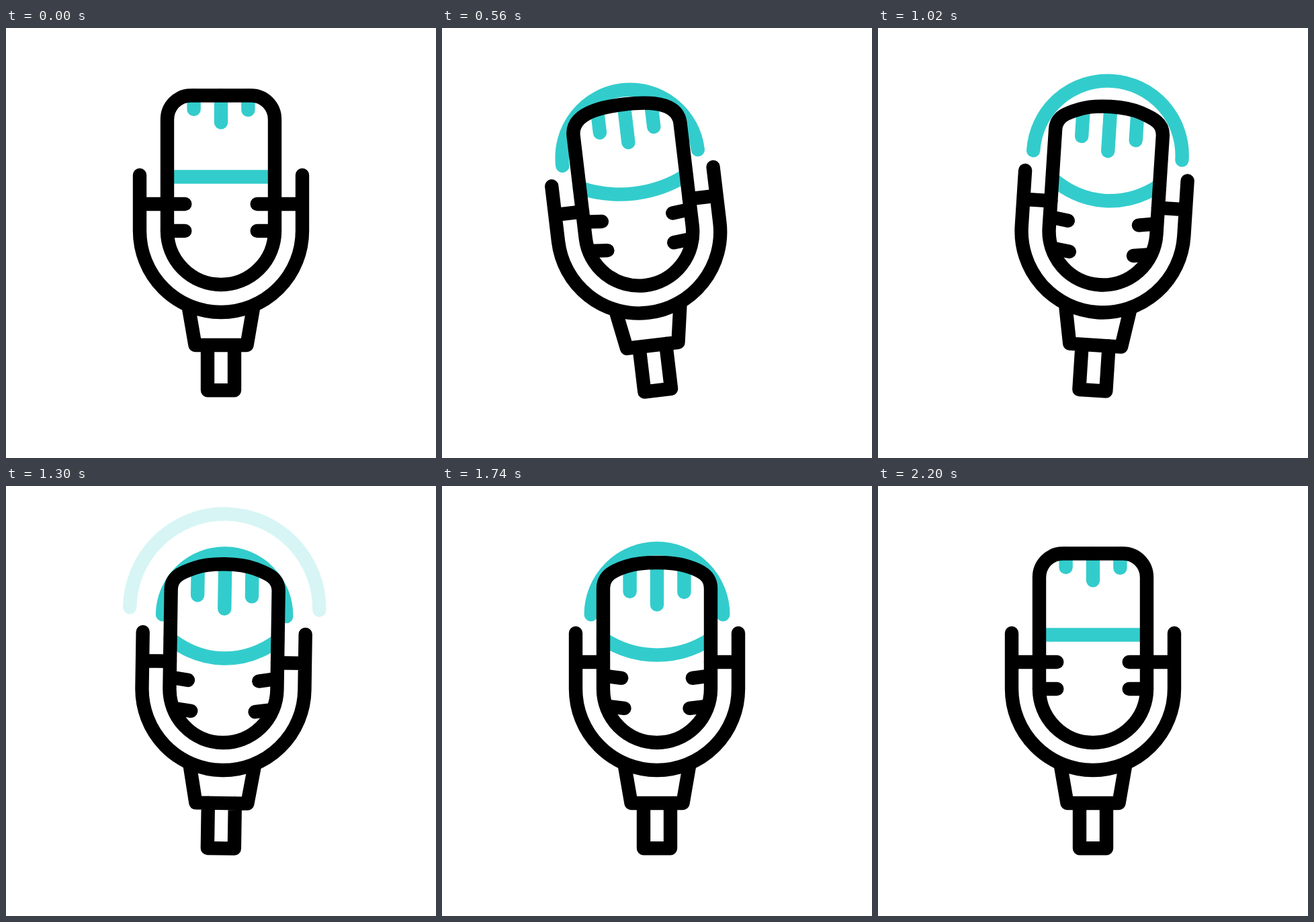
Recreate the animation shown at these times as an HTML page. Size 640 px wide and 640 px high, loop 2400 ms.

```html
<!DOCTYPE html>
<html>
<head>
<meta charset="utf-8">
<title>Microphone</title>
<style>
html, body { margin: 0; width: 100%; height: 100%; overflow: hidden; background: #fff; }
svg { display: block; width: 100vw; height: 100vh; fill: none; stroke-width: 20.4; stroke-linecap: round; stroke-linejoin: round; }
.teal { stroke: #3cc; }
.black { stroke: #000; }
</style>
</head>
<body>
<svg viewBox="0 0 640 640">
  <g id="mic">
    <g id="waves" class="teal"></g>
    <path id="back" fill="#fff"/>
    <path id="bar" class="teal"/>
    <path id="drips" class="teal"/>
    <g class="black">
      <path id="head"/>
      <path id="whiskers"/>
      <path d="M199 219V302A121 121 0 0 0 441 302V219M199 262H240M400 262H441"/>
      <path d="M272 417L281.5 472H358.5L368 417M300 472V539.3H340V472"/>
    </g>
  </g>
</svg>
<script>
const LOOP = 2400, WAVE_LIFE = 740, WAVE_STARTS = [200, 600, 1000, 1400];
const SWING = [[0, 0], [200, 0], [775, -10.8], [1120, 9.5], [1445, -6], [1700, 0], [LOOP, 0]];
const $ = id => document.getElementById(id);
const set = (id, d) => $(id).setAttribute('d', d);
const clamp = x => Math.max(0, Math.min(1, x));
const ease = x => { x = clamp(x); return x * x * (3 - 2 * x); };

const waves = WAVE_STARTS.map(() =>
  $('waves').appendChild(document.createElementNS('http://www.w3.org/2000/svg', 'path')));

function swing(t) {
  const i = SWING.findIndex(k => k[0] > t);
  const [t0, a] = SWING[i - 1], [t1, b] = SWING[i];
  return a + (b - a) * (t - t0) / (t1 - t0);
}

function drawWave(wave, age) {
  const r = 64 + 77.7 * ease(age / WAVE_LIFE);
  const y = 211.6 - 0.206 * r;
  const alpha = age < 0 ? 0 : clamp((WAVE_LIFE - age) / 200);
  wave.setAttribute('d', `M${320 - r} ${y}A${r} ${r} 0 0 1 ${320 + r} ${y}`);
  wave.setAttribute('opacity', alpha);
}

// m is how far the head is bent forward, 0 to 1
function drawHead(m) {
  const top = k => 100.5 + k * m;
  const head = `M240 302V${136 + 19 * m}
    C240 ${116.6 + 19 * m} 255.6 ${top(29)} 275 ${top(22)}
    C288 ${top(17.3)} 304 ${top(15.7)} 320 ${top(15.7)}
    S352 ${top(17.3)} 365 ${top(22)}
    C384.4 ${top(29)} 400 ${116.6 + 19 * m} 400 ${136 + 19 * m}
    V302A80 80 0 0 1 240 302Z`;
  set('back', head);
  set('head', head);

  const bar = k => 221.5 + k * m;
  set('bar', `M240 ${bar(7)}C260 ${bar(22)} 288 ${bar(35)} 320 ${bar(35)}
    S380 ${bar(22)} 400 ${bar(7)}`);

  const drip = (x, start, end) => `M${x} ${top(start)}V${end + 42 * m}`;
  set('drips', drip(279.6, 21, 121) + drip(320, 16, 140.5) + drip(360.4, 21, 122));

  const pair = (x0, y0, x1, y1) =>
    `M${x0} ${y0}L${x1} ${y1}M${640 - x0} ${y0}L${640 - x1} ${y1}`;
  set('whiskers', pair(242, 262 + 24 * m, 266.3 + m, 262 + 27.7 * m) +
    pair(240 + 7 * m, 302 + 30 * m, 266.3 + 6 * m, 302 + 33.5 * m));
}

function frame() {
  const t = performance.now() % LOOP;
  $('mic').setAttribute('transform', `rotate(${swing(t)} 320 529)`);
  waves.forEach((wave, i) => drawWave(wave, t - WAVE_STARTS[i]));
  drawHead(ease((t - 200) / 600) - ease((t - 1600) / 600));
  requestAnimationFrame(frame);
}
frame();
</script>
</body>
</html>
```
